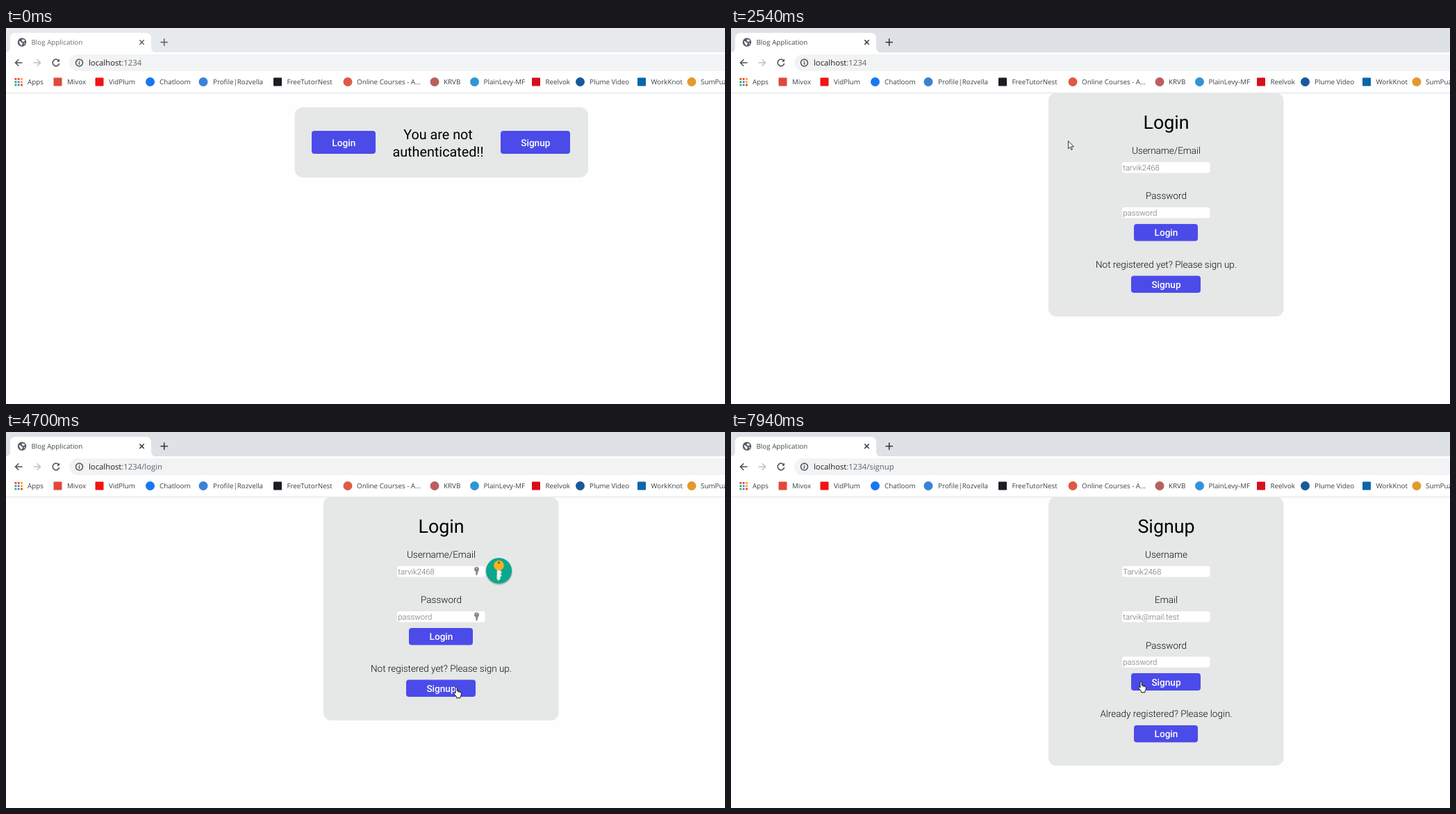
An HTML page for the animation above (8 s loop, 1035 px wide and 541 px high).

```html
<!DOCTYPE html>
<html lang="en">
<head>
<meta charset="utf-8">
<title>Blog Application</title>
<style>
html, body { margin: 0; width: 100%; height: 100%; overflow: hidden; background: #fefefe; }
svg { display: block; width: 100%; height: 100%; }
text { text-rendering: geometricPrecision; font-family: Roboto, Arial, sans-serif; }
.ui { font-family: "Open Sans", "Noto Sans", sans-serif; font-size: 9.8px; fill: #3c4043; }
.url { font-family: "Open Sans", "Noto Sans", sans-serif; font-size: 11.3px; fill: #202124; }
.h { font-size: 26.8px; text-anchor: middle; }
.msg { font-size: 19.8px; text-anchor: middle; }
.lbl { font-size: 13.5px; font-weight: 300; text-anchor: middle; fill: #0c0c0c; }
.btn { font-size: 13.6px; font-weight: 500; text-anchor: middle; fill: #fff; }
.ph { font-size: 11.4px; font-weight: 300; fill: #707070; }
.card { fill: #e6e7e7; }
.line { fill: none; stroke-width: 1.5; }
</style>
</head>
<body>
<svg id="stage" viewBox="0 0 1035 541" preserveAspectRatio="none">
  <rect width="1035" height="541" fill="#fefefe"/>
  <rect id="strip" width="1035" height="36"/>
  <path d="M-2 35.5Q6 35.5 6 27.5V15Q6 7 14 7H201Q209 7 209 15V27.5Q209 35.5 217 35.5Z" fill="#fff"/>
  <rect y="35" width="1035" height="58" fill="#fff"/>
  <rect y="93" width="1035" height="1" fill="#dfe1e4"/>
  <circle cx="23" cy="20.5" r="6.2" fill="#565a6a"/>
  <path d="M18.5 19q3-.5 3.500 1.800l2 .7-1.200 3.700-2.300-1.500zM23.500 16.200l3.500 1-.5 2.300-2.500.300-1.500-1.600zM25.500 22l2-.5-1 2.500z" fill="#fff"/>
  <text id="title" class="ui" x="36.500" y="24.300">Blog Application</text>
  <g id="marks" class="line">
    <path d="M192.300 17.300l6.400 6.400m0-6.400l-6.400 6.400"/>
    <path d="M222.500 20.500h10.400m-5.200-5.200v10.400"/>
  </g>
  <g class="line" stroke="#4b4f54">
    <path d="M23.500 50H13.500m4.800-4.800L13.500 50l4.800 4.800"/>
    <path d="M39.500 50h10m-4.800-4.800l4.800 4.800-4.800 4.800" stroke="#bdc0c4"/>
    <path d="M75.700 46.800A4.800 4.800 0 1 0 76.700 51"/>
    <path d="M77 44.500v4h-4z" fill="#4b4f54" stroke="none"/>
  </g>
  <rect x="91" y="38" width="980" height="24" rx="12" fill="#f1f3f4"/>
  <g class="line" stroke="#4b4f54" stroke-width="1.200">
    <circle cx="105.500" cy="50" r="5"/>
    <path d="M105.500 49.200v3.600m0-5.600v1.200"/>
  </g>
  <text class="url" x="119" y="54.300">localhost<tspan id="path" fill="#5f6368"></tspan></text>
  <g id="bar"></g>
  <g id="home"></g>
  <g id="login"></g>
  <g id="signup"></g>
  <g id="hints" fill="#858585"></g>
  <g id="badge">
    <circle cx="709.700" cy="200.800" r="19.300" fill="#8d9997" opacity=".55"/>
    <circle cx="709.500" cy="199.700" r="18.500" fill="#0ba88d"/>
    <g id="key">
      <path id="shaft" d="M707 198h5v2.500h1.600v3H712v1.500h1.600v3H712v3.500l-2.500 2.500-2.500-2.500z" fill="#f4f1e6"/>
      <circle cx="709.500" cy="192" r="7.300" fill="#f4b223"/>
      <circle cx="709.500" cy="188" r="1.700" fill="#80662a"/>
    </g>
  </g>
  <g id="cursor" stroke-linejoin="round">
    <path id="arrow" d="M0 0V11.200L2.600 8.800 4.400 12.800 6 12.100 4.300 8.200H7.800Z" fill="#fff" stroke="#222" stroke-width=".9"/>
    <g id="hand" transform="translate(-3.500 -.5)">
      <path d="M3 10V2a1.200 1.200 0 0 1 2.400 0v4.500l4.600 1.200q1.500.5 1.500 2.200l-.6 3.600-1 1.500v1.700H4.600v-1.500L1 10.800Q0 9 1.200 8.600 2 8.500 3 10z" fill="#fff" stroke="#111" stroke-width="1"/>
      <path d="M7.300 7.200v2m2-1.500v1.800" stroke="#111" stroke-width=".7"/>
    </g>
  </g>
  <circle id="click" r="10.300" fill="#f5e600" opacity=".55"/>
</svg>
<script>
const LOOP = 8000, MID = 626.5, BLUE = '#4b4bea';
const $ = id => document.getElementById(id);
const show = (id, on) => $(id).setAttribute('visibility', on ? 'visible' : 'hidden');

function add(parent, tag, attrs, text) {
  const el = document.createElementNS('http://www.w3.org/2000/svg', tag);
  for (const k in attrs) el.setAttribute(k, attrs[k]);
  if (text) el.textContent = text;
  $(parent).append(el);
}
const rect = (g, x, y, width, height, rx, fill) => add(g, 'rect', { x, y, width, height, rx, fill });
const text = (g, cls, x, y, str) => add(g, 'text', { class: cls, x, y }, str);

// Clickable areas per page, used to choose the pointer shape
const hits = { home: [], login: [], signup: [] };
function button(g, label, cx, y, h) {
  const w = label === 'Login' ? 92 : 100, x = Math.floor(cx - w / 2);
  rect(g, x, y, w, h, 4, BLUE);
  text(g, 'btn', cx, y + h / 2 + 5, label);
  hits[g].push([x, y, w, h]);
}
function field(g, label, hint, y) {
  text(g, 'lbl', MID, y - 11.800, label);
  rect(g, 563, y, 126.500, 15.500, 3, '#fff');
  text(g, 'ph', 564.300, y + 11.500, hint);
}
function form(g, title, bottom) {
  add(g, 'rect', { class: 'card', x: 457, y: 93.500, width: 338.500, height: bottom - 93.500, rx: 11 });
  text(g, 'h', MID, 145, title);
}

// Bookmarks bar: icon centre, colour, square?, label x, label
[
  [74.5, '#e0483c', 1, 88, 'Mivox'],
  [134.5, '#f01414', 1, 148, 'VidPlum'],
  [207.5, '#1877f2', 0, 221, 'Chatloom'],
  [284, '#3b82d6', 0, 298, 'Profile|Rozvella'],
  [391, '#1c1c24', 1, 404.5, 'FreeTutorNest'],
  [492, '#dd5a45', 0, 505, 'Online Courses - A...'],
  [617, '#b9605f', 0, 630, 'KRVB'],
  [674.5, '#2f95d8', 0, 687.5, 'PlainLevy-MF'],
  [763, '#d5101b', 1, 776.5, 'Reelvok'],
  [826.5, '#175a9c', 0, 840, 'Plume Video'],
  [915, '#0a66a8', 1, 928.5, 'WorkKnot'],
  [987, '#e29a2c', 0, 1000, 'SumPuzzle']
].forEach(([cx, fill, square, x, label]) => {
  if (square) rect('bar', cx - 6, 71.5, 12, 12, 1, fill);
  else add('bar', 'circle', { cx, cy: 77.5, r: 6.500, fill });
  text('bar', 'ui', x, 81.300, label);
});
const dots = ['#e94235', '#e94235', '#f9ab00', '#34a853', '#4285f4', '#f9ab00', '#34a853', '#4285f4', '#e94235'];
dots.forEach((c, i) => rect('bar', 12.500 + i % 3 * 4.300, 72 + (i / 3 | 0) * 4.300, 2.800, 2.800, 0, c));
text('bar', 'ui', 31, 81.300, 'Apps');

add('home', 'rect', { class: 'card', x: 415.500, y: 114, width: 422.500, height: 101, rx: 12 });
button('home', 'Login', 486.300, 148, 33);
text('home', 'msg', 622, 160, 'You are not');
text('home', 'msg', 622, 185, 'authenticated!!');
button('home', 'Signup', 762.300, 148, 33);

form('login', 'Login', 415);
field('login', 'Username/Email', 'tarvik2468', 193);
field('login', 'Password', 'password', 258);
button('login', 'Login', MID, 282, 24.500);
text('login', 'lbl', MID, 345, 'Not registered yet? Please sign up.');
button('login', 'Signup', MID, 356.500, 24.500);

form('signup', 'Signup', 480);
field('signup', 'Username', 'Tarvik2468', 193);
field('signup', 'Email', 'tarvik@mail.test', 258);
field('signup', 'Password', 'password', 323.300);
button('signup', 'Signup', MID, 347, 25);
text('signup', 'lbl', MID, 410, 'Already registered? Please login.');
button('signup', 'Login', MID, 422, 24.500);

for (const y of [194, 259.500]) {
  add('hints', 'circle', { cx: 677.500, cy: y + 3.500, r: 3.400 });
  add('hints', 'path', { d: `M676.300 ${y + 6}h2.400v1h1v1.500h-1v2.500l-1.200 1.500-1.200-1.500z` });
  add('hints', 'circle', { cx: 677.500, cy: y + 2, r: .8, fill: '#fff' });
}

// Bursts of movement: start, end, number of steps
const bursts = [[180, 320, 3], [650, 1410, 12], [1480, 1550, 2], [3160, 3930, 12],
  [4000, 4770, 12], [4840, 5380, 9], [6790, 7000, 4], [7730, 7940, 4]];
// Pointer hotspot: time, x, y
const track = [
  [180, 917, 485], [250, 797, 384], [320, 691, 299], [580, 691, 299],
  [860, 560, 214], [1130, 464, 155], [1410, 482.5, 159.5], [1550, 485.5, 162.5],
  [3090, 485.5, 162.5], [3370, 619, 306], [3580, 638, 338], [3930, 643.5, 361],
  [4630, 647.5, 366.5], [6720, 647.5, 366.5], [7000, 647, 360.5],
  [7660, 647, 360.5], [7940, 589.5, 358.5]
];
const clamp = v => Math.max(0, Math.min(1, v));

function snap(t) {
  let out = 0;
  for (const [a, b, n] of bursts) {
    if (t < a) break;
    const dt = (b - a) / (n - 1);
    out = a + Math.min(n - 1, Math.floor((t - a) / dt + .02)) * dt;
  }
  return out;
}
function pointer(t) {
  let i = 0;
  while (i < track.length - 2 && t > track[i + 1][0]) i++;
  const [a, x, y] = track[i], [b, u, v] = track[i + 1], k = clamp((t - a) / (b - a));
  return [x + (u - x) * k, y + (v - y) * k];
}

function draw(t) {
  const page = t < 2410 ? 'home' : t < 5920 ? 'login' : 'signup';
  for (const p in hits) show(p, p === page);
  $('path').textContent = ':1234' + (t < 2610 ? '' : '/' + page);

  const active = t >= 2220;
  $('strip').setAttribute('fill', active ? '#dee1e6' : '#e7eaed');
  $('title').style.fill = active ? '#45494d' : '#6b6e73';
  $('marks').setAttribute('stroke', active ? '#303236' : '#5b5e63');

  const s = snap(t), [x, y] = pointer(s);
  const area = t < 2540 ? 'home' : page;
  const over = hits[area].some(([l, top, w, h]) => x >= l && x < l + w && y >= top && y < top + h - .6);
  $('cursor').setAttribute('transform', `translate(${x} ${y})`);
  show('arrow', t >= 180 && !over);
  show('hand', t >= 180 && over);
  $('click').setAttribute('transform', `translate(${x} ${y})`);
  show('click', t >= 2150 && t < 2410 || t >= 5650 && t < 5920);

  show('hints', t >= 2830 && page === 'login');
  show('badge', t >= 3160 && page === 'login');
  const grow = clamp((s - 3090) / 210);
  $('badge').setAttribute('transform', `translate(709.5 199.7) scale(${grow}) translate(-709.5 -199.7)`);
  const drop = clamp((s - 3370) / 490);
  $('shaft').setAttribute('transform', `translate(0 192) scale(1 ${drop}) translate(0 -192)`);
  const w = s - 3930;
  const swing = w > 0 && s < 5370 ? -30 * Math.exp(-w / 450) * Math.sin(w / 500 * 2 * Math.PI) : 0;
  $('key').setAttribute('transform', `rotate(${swing} 709.5 191.5)`);
}

let start;
function tick(now) {
  start ??= now;
  draw((now - start) % LOOP);
  requestAnimationFrame(tick);
}
draw(0);
requestAnimationFrame(tick);
</script>
</body>
</html>
```
